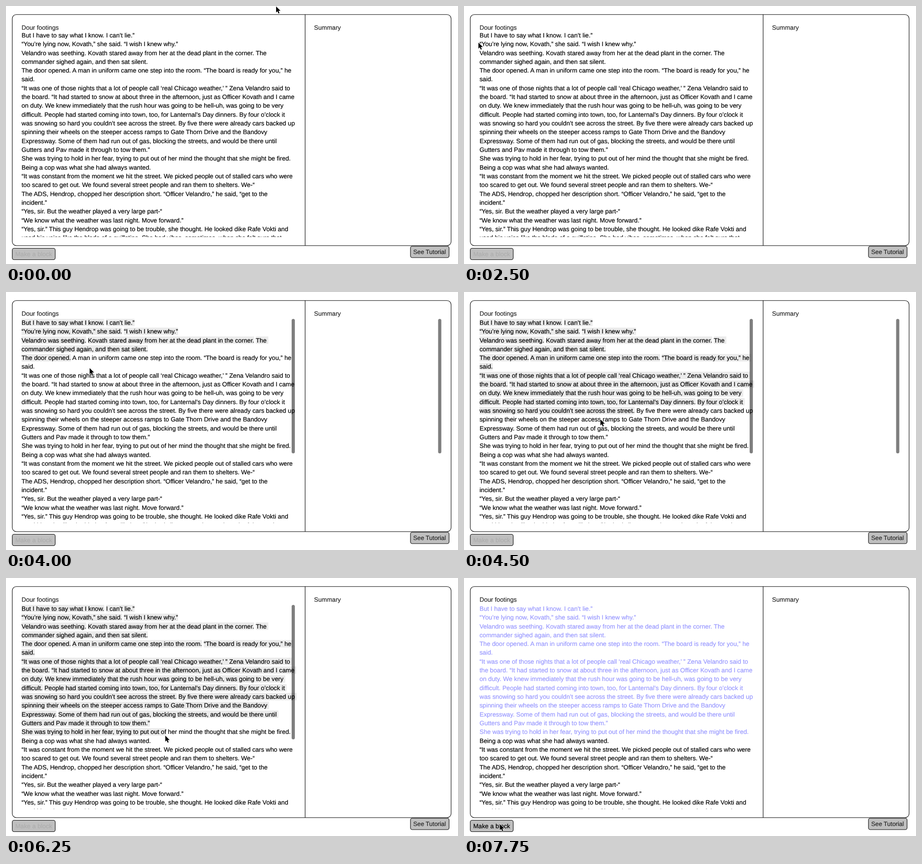
An HTML page that plays this animation: 989 px wide and 566 px high, repeating every 8 s.

```html
<!DOCTYPE html>
<html lang="en">
<head>
<meta charset="utf-8">
<title>Reading view</title>
<style>
html, body { margin: 0; width: 100%; height: 100%; overflow: hidden; background: #fff; }
svg { display: block; width: 989px; height: 566px; }
text {
  font: 13.7px "Liberation Sans", Arial, sans-serif; text-rendering: geometricPrecision; white-space: pre;
  fill: currentColor; stroke: currentColor; stroke-width: .2;
}
.label { color: #262626; }
.small { font-size: 13.4px; }
.frame { fill: none; stroke: #000; stroke-width: 1.1; }
.button { fill: #bfbfbf; stroke: #000; stroke-width: 1.1; }
.bar { fill: #000; fill-opacity: .5; }
</style>
</head>
<body>
<svg viewBox="0 0 989 566">
  <defs><clipPath id="view"><rect x="20" y="58.5" width="620" height="448"/></clipPath></defs>
  <rect class="frame" x="13.7" y="18.7" width="960.2" height="507" rx="9"/>
  <path class="frame" d="M654.5 18.7V525.7"/>
  <text class="label" x="34" y="52.3">Dour footings</text>
  <text class="label" x="674" y="52.3">Summary</text>
  <g clip-path="url(#view)"><g id="story"></g></g>
  <rect id="barL" class="bar" x="625" y="59" width="7" height="295" rx="3.5"/>
  <rect id="barR" class="bar" x="945.5" y="59" width="7" height="295" rx="3.5"/>
  <rect class="button" x="13.7" y="531.5" width="94" height="25" rx="4"/>
  <text id="make" x="20.2" y="548.8">Make a block</text>
  <rect class="button" x="885" y="527" width="84.5" height="25" rx="4"/>
  <text class="label small" x="891" y="543.8">See Tutorial</text>
  <path id="cursor" d="M0 0V13.2L3 10.4L5.2 15.4L7.4 14.5L5.3 9.6H9.6Z" stroke="#fff" stroke-width="1.6" paint-order="stroke"/>
</svg>
<script>
const LOOP = 8000, STEP = 250, PRESS = 4000, RELEASE = 6500;
const LEFT = 34, BASE = 71.87, PITCH = 19.32, PICKED_LINES = 15;

// "|" marks a stop of the highlight inside a sentence
const lines = `But I have to say what I know. I can’t lie.”
“You’re lying now, Kovath,” she said. “I wish I knew why.”
Velandro was seething. Kovath stared away from her at the dead plant in the corner. The
commander sighed again, and then sat silent.
The door opened. A man in uniform came one step into the room. “The board is ready for you,” he
said.
“It was one of those nights that a lot of people call ‘real Chicago weather,’ ” Zena Velandro said to
the board. “It had started to snow at about three in the afternoon, just as Officer Kovath and I came
on duty. We knew immediately that the rush hour was going to be hell-uh, was going to be very
difficult. People had started coming into town, too, for Lanternal’s Day dinners. By four o’clock it
was snowing so hard you couldn’t see across the street. By five there were already cars backed up
spinning their wheels on the steeper access ramps to Gate Thorn Drive and the Bandovy
Expressway. Some of them had run out of gas, blocking the streets, and would be there until
Gutters and Pav made it through to tow them.”
She was trying to hold in her fear, trying to put out of| her mind the thought that she might be fired.
Being a cop was what she had always wanted.
“It was constant from the moment we hit the street. We picked people out of stalled cars who were
too scared to get out. We found several street people and ran them to shelters. We-“
The ADS, Hendrop, chopped her description short. “Officer Velandro,” he said, “get to the
incident.”
“Yes, sir. But the weather played a very large part-“
“We know what the weather was last night. Move forward.”
“Yes, sir.” This guy Hendrop was going to be trouble, she thought. He looked dike Rafe Vokti and
used his voice like the blade of a guillotine. She had vibes, sometimes, when she felt sure that`.split("\n");

// the pointer eases out along each leg and rests in between
const home = { x: 591, y: 1 };
const legs = [
  { from: 0, to: 750, x: 226, y: 78 },
  { from: 1000, to: 1250, x: 84, y: 63 },
  { from: 1250, to: 1750, x: 33, y: 89 },
  { from: 2250, to: 3500, x: 29, y: 65 },
  { from: 3750, to: PRESS, x: 183, y: 167 },
  { from: PRESS, to: 5000, x: 337, y: 317 },
  { from: 5250, to: RELEASE, x: 349, y: 347 },
  { from: 6750, to: 7750, x: 78.5, y: 540 }
];

const $ = id => document.getElementById(id);
const show = (el, on) => el.setAttribute("visibility", on ? "visible" : "hidden");
const easeOut = p => 1 - (1 - p) ** 2;

function pointer(t) {
  return legs.reduce((pos, leg) => {
    const p = Math.min(1, Math.max(0, (t - leg.from) / (leg.to - leg.from)));
    const k = easeOut(p);
    return { x: pos.x + (leg.x - pos.x) * k, y: pos.y + (leg.y - pos.y) * k };
  }, home);
}

function add(tag, attrs, parent) {
  const el = document.createElementNS("http://www.w3.org/2000/svg", tag);
  for (const k in attrs) el.setAttribute(k, attrs[k]);
  return parent.appendChild(el);
}

const marks = [];
const texts = [];

function build() {
  const back = add("g", { fill: "#ebebeb" }, $("story"));
  const front = add("g", {}, $("story"));
  let head = null;
  lines.forEach((line, row) => {
    const y = BASE + row * PITCH;
    const text = add("text", { x: LEFT, y }, front);
    text.textContent = line.replace("|", "");
    texts.push(text);
    const edge = n => LEFT + (n ? text.getSubStringLength(0, n) : 0);
    let pos = 0;
    for (const piece of line.split(/(?<=[.|]”?) /)) {
      const end = pos + piece.replace("|", "").length;
      const closed = /[.|]”?$/.test(piece);
      const x = edge(pos);
      const width = edge(end) - x + (closed ? 0 : 3.8);
      const el = add("rect", { x, y: y - 13, width, height: 16.3 }, back);
      // a sentence lights up once the pointer is a third into its first piece
      head = head || { row, x: x + width / 3 };
      marks.push({ el, head });
      if (closed) head = null;
      pos = end + 1;
    }
  });
}

function draw(time) {
  const t = Math.floor(time / STEP) * STEP;
  const { x, y } = pointer(t);
  const row = Math.floor((y - BASE) / PITCH);
  const picked = t >= RELEASE;
  const dragging = t >= PRESS && !picked;
  const passed = head => head.row < row || (head.row === row && head.x <= x);

  $("cursor").setAttribute("transform", `translate(${x} ${y})`);
  $("story").setAttribute("transform", `translate(0 ${t < PRESS ? -3 : 0})`);
  marks.forEach(m => show(m.el, dragging && passed(m.head)));
  texts.forEach((el, i) => el.setAttribute("color", picked && i < PICKED_LINES ? "#9696ff" : "#000"));
  show($("barL"), dragging);
  show($("barR"), dragging && t < 4750);
  $("make").setAttribute("color", picked ? "#000" : "#adadad");
}

function tick() {
  draw(performance.now() % LOOP);
  requestAnimationFrame(tick);
}

build();
tick();
</script>
</body>
</html>
```
